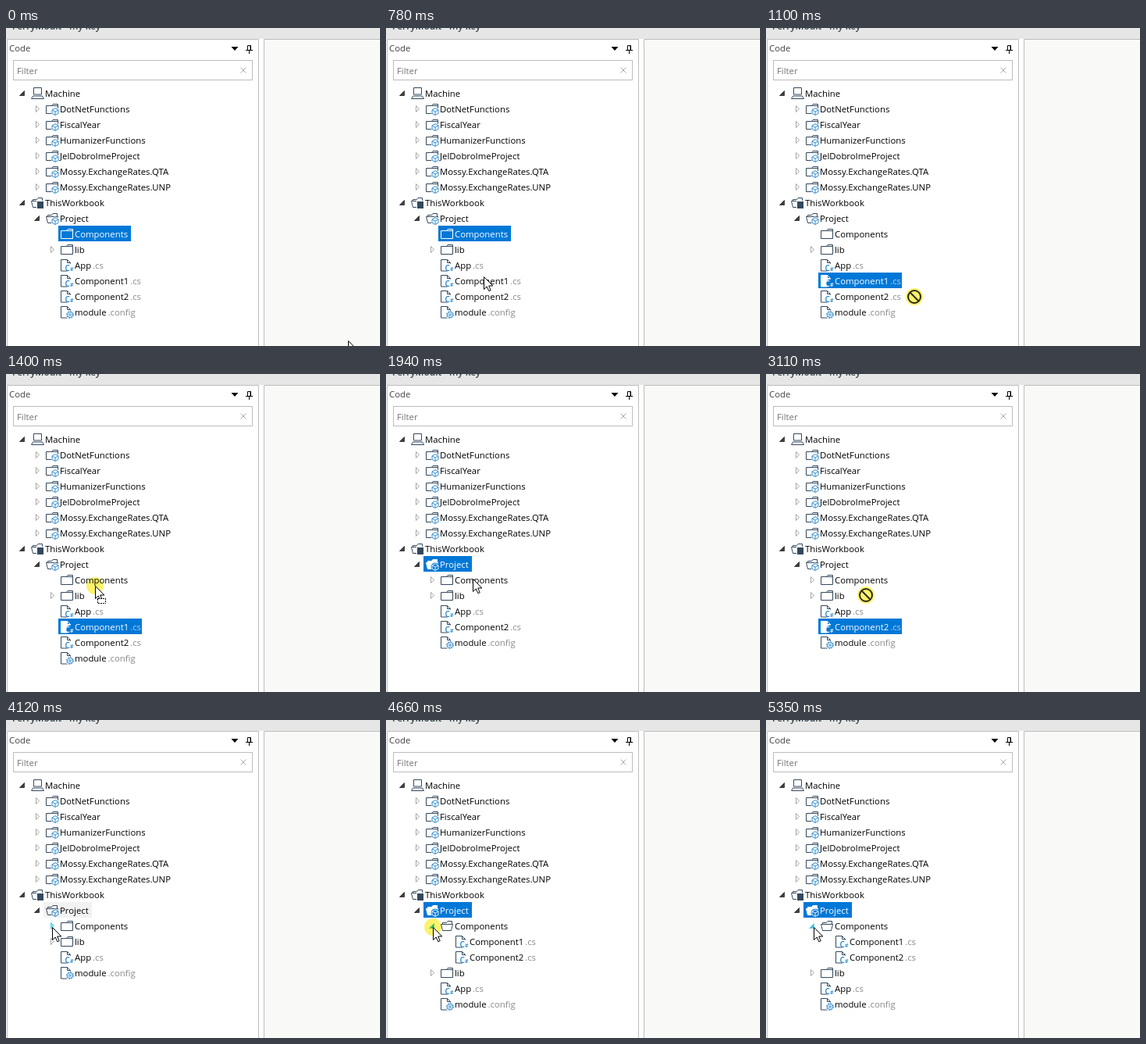
These frames come from a looping animation (479 px wide and 407 px high, 6830 ms). An HTML page:

```html
<!DOCTYPE html>
<html lang="en">
<head>
<meta charset="utf-8">
<title>Project tree</title>
<style>
html, body { margin: 0; width: 100%; height: 100%; overflow: hidden; background: #fff; }
svg { display: block; }
text { font: 11.35px "Open Sans", "Noto Sans", sans-serif; white-space: pre; }
.glow { fill: #fcf25a; fill-opacity: .9; mix-blend-mode: multiply; }
</style>
</head>
<body>
<svg id="stage" width="479" height="407" viewBox="0 0 479 407">
  <rect width="479" height="407" fill="#fff"/>
  <rect width="479" height="14" fill="#e6e6e6"/>
  <text x="8" y="2" fill="#34474d" style="font-size:11.8px;font-weight:600">FerryMoult - my key</text>
  <rect x="331" y="14" width="148" height="393" fill="#f9f9f8"/>
  <g fill="none" stroke="#bdbdbd">
    <path d="M1.5 407V14.5H323.5V407M330.5 407V14.5H479"/>
    <rect x="9.5" y="41.5" width="306" height="25"/>
    <path d="M300.5 50.5l7 7m0-7l-7 7" stroke="#aaa"/>
  </g>
  <text x="4" y="30" fill="#444">Code</text>
  <text x="14" y="59" fill="#767676">Filter</text>
  <path d="M288.5 24h9l-4.5 5z"/>
  <path d="M309.5 28V22.5h4V28M313 22v6M307 28.5h9M311.5 29v4" fill="none" stroke="#000"/>
  <g id="tree"></g>
  <g id="pointer"></g>
</svg>
<script>
const LOOP = 6830;
const tree = document.getElementById('tree');
const pointer = document.getElementById('pointer');

const path = (d, stroke, fill = 'none') => `<path d="${d}" stroke="${stroke}" fill="${fill}"/>`;

const FOLDER = 'M.5 6.5h7l1.5-2h6.5v12h-15zM7.5 6.5h8';
const OPEN = 'M2.5 8.5v-2h5l1.5-2h5.5v4M.5 8.500h15l-2 8h-11z';
const PAGE = 'M.5 3.5h8l4 4v10.5h-12zM8.5 3.5v4h4';

// Clears a corner of the icon for its badge
const patch = ground => `<circle cx="12" cy="14" r="5.5" fill="${ground}"/>`;

function cube(ink, ground) {
  return patch(ground) + '<g stroke-width=".9">' +
    path('M12 9.7l4 2.2v4.4l-4 2.2-4-2.2v-4.4z', ink) +
    path('M8.3 12.100l3.700 2 3.700-2M12 14.100v4', ink) + '</g>';
}

function gear(ink, ground) {
  return patch(ground) + `<g fill="none" stroke="${ink}">` +
    '<circle cx="12" cy="14" r="4.4" stroke-dasharray="1.7 1.756"/>' +
    '<circle cx="12" cy="14" r="3.5" stroke-width=".9"/><circle cx="12" cy="14" r="1.3" stroke-width=".9"/></g>';
}

function sharp(ink, ground) {
  return patch(ground) + `<g fill="${ink}"><text x="5.5" y="18" style="font-size:10px;font-weight:600">C</text>` +
    '<text x="12" y="18" style="font-size:7px;font-weight:600">#</text></g>';
}

const icons = {
  machine: ink => path('M3.5 3.5h10v8.500h-10zM.5 17.5l2-3.500h12l2 3.500z', ink),
  book: (ink, blue, ground) => path(OPEN, ink) +
    `<rect x="7" y="8" width="10" height="11" fill="${ground}"/><rect x="8" y="9" width="8" height="9" fill="${ink}"/>`,
  module: (ink, blue, ground) => path(FOLDER, ink) + cube(blue, ground),
  project: (ink, blue, ground, body) => path(OPEN, ink, body) + cube(blue, ground),
  folder: ink => path(FOLDER, ink),
  open: ink => path(OPEN, ink),
  code: (ink, blue, ground, body) => path(PAGE, ink, body) + sharp(blue, ground),
  config: (ink, blue, ground) => path(PAGE, ink) + gear(blue, ground)
};

function expander(kind, hover) {
  if (kind === 'down') {
    return hover ? path('M6.5 7.5v6h-6z', '#6fd2f0', '#3fc0ea') : path('M6.5 7.5v6h-6z', '#404040', '#404040');
  }
  return path('M2.5 6.5l4 4-4 4z', hover ? '#4cc8ee' : '#a6a6a6', hover ? '#8fe0f7' : '#fff');
}

// Selection widths by label
const barWidth = { Components: 93, Component1: 107, Component2: 107, Project: 62 };

function row(item, i, state) {
  const { depth, icon, label, ext = '', arrow } = item;
  const x = 50 + 19 * depth, y = 73 + 20 * i;
  const on = state.sel === label, soft = state.soft === label;
  const ground = on ? '#0078d7' : soft ? '#f2f2f2' : '#fff';
  const ink = on ? '#fff' : '#34495e', blue = on ? '#fff' : '#1e82c8';
  const body = on ? '#fff' : 'none';
  let out = '';
  if (on || soft) out += `<rect x="${x - 21}" y="${y}" width="${barWidth[label]}" height="20" fill="${ground}"/>`;
  if (arrow) out += `<g transform="translate(${x - 33} ${y})">${expander(arrow, state.hover && label === 'Components')}</g>`;
  out += `<g transform="translate(${x - 18} ${y})">${icons[icon](ink, blue, ground, body)}</g>`;
  out += `<text x="${x}" y="${y + 15}" fill="${on ? '#fff' : '#000'}">${label}` +
    (ext && `<tspan dx="2" fill="${on ? '#b5cfe6' : '#8a8a8a'}">${ext}</tspan>`) + '</text>';
  return out;
}

const modules = ['DotNetFunctions', 'FiscalYear', 'HumanizerFunctions', 'JelDobroImeProject',
  'Mossy.ExchangeRates.QTA', 'Mossy.ExchangeRates.UNP'];

function items({ loose, inside = 0, expanded }) {
  const file = (n, depth) => ({ depth, icon: 'code', label: 'Component' + n, ext: '.cs' });
  return [
    { depth: 0, icon: 'machine', label: 'Machine', arrow: 'down' },
    ...modules.map(label => ({ depth: 1, icon: 'module', label, arrow: 'right' })),
    { depth: 0, icon: 'book', label: 'ThisWorkbook', arrow: 'down' },
    { depth: 1, icon: 'project', label: 'Project', arrow: 'down' },
    { depth: 2, icon: expanded ? 'open' : 'folder', label: 'Components', arrow: expanded ? 'down' : inside ? 'right' : '' },
    ...(expanded ? [file(1, 3), file(2, 3)] : []),
    { depth: 2, icon: 'folder', label: 'lib', arrow: 'right' },
    { depth: 2, icon: 'code', label: 'App', ext: '.cs' },
    ...loose.map(n => file(n, 2)),
    { depth: 2, icon: 'config', label: 'module', ext: '.config' }
  ];
}

const states = [
  { at: 0, loose: [1, 2], sel: 'Components' },
  { at: 870, loose: [1, 2], sel: 'Component1' },
  { at: 1940, loose: [2], inside: 1, sel: 'Project' },
  { at: 2030, loose: [2], inside: 1, soft: 'Project' },
  { at: 2650, loose: [2], inside: 1, sel: 'Component2' },
  { at: 3820, loose: [], inside: 2, soft: 'Project' },
  { at: 4120, loose: [], inside: 2, soft: 'Project', hover: true },
  { at: 4510, loose: [], inside: 2, sel: 'Project', hover: true, expanded: true }
];

// Pointer stops: time, x, y, shape, pressed
const stops = [
  [0, 438, 400], [80, 322, 381], [160, 206, 361],
  [310, 188, 352], [390, 160, 337], [470, 139, 326], [550, 128, 320], [630, 124, 318],
  [780, 125, 318], [870, 125, 318, 'arrow', 1], [950, 150, 327, 'no', 1], [1030, 190, 344, 'no', 1],
  [1110, 212, 355, 'no', 1], [1180, 182, 329, 'no', 1], [1250, 144, 298, 'no', 1],
  [1330, 122, 278, 'move', 1], [1400, 114, 271, 'move', 1],
  [1480, 113, 266, 'move', 1], [1560, 111, 262, 'move', 1], [1640, 111, 262, 'move'], [1710, 111, 262],
  [2260, 115, 284], [2330, 119, 314], [2400, 120, 333],
  [2650, 121, 329, 'arrow', 1], [2730, 123, 330, 'arrow', 1], [2800, 126, 331, 'no', 1], [2870, 127, 331, 'no', 1],
  [3040, 128, 308, 'no', 1], [3110, 128, 283, 'no', 1], [3190, 123, 271, 'move', 1], [3270, 120, 267, 'move', 1],
  [3420, 119, 263, 'move', 1], [3500, 119, 263],
  [3970, 97, 264], [4050, 73, 265], [4120, 59, 265], [4200, 57, 265], [4280, 60, 265],
  [4430, 60, 265, 'arrow', 1], [4740, 60, 265], [5350, 61, 265]
];

const ARROW = path('M.5.5v16l3.7-3.5 2.6 5.7 2.4-1-2.5-5.7h5.1z', '#000', '#fff');
const shapes = {
  arrow: ARROW,
  move: ARROW + '<rect x="3.5" y="16.5" width="10" height="6" fill="#fff" stroke="#000" stroke-dasharray="2 1" shape-rendering="crispEdges"/>',
  no: '<g fill="none" stroke="#2b2b22" stroke-width="2"><circle r="8"/><path d="M-5.7-5.7L5.7 5.7"/></g>'
};

function drawPointer([, x, y, shape = 'arrow', pressed]) {
  const glow = pressed ? `<circle class="glow" cx="${x}" cy="${y}" r="11"/>` : '';
  pointer.innerHTML = `${glow}<g transform="translate(${x} ${y})">${shapes[shape]}</g>`;
}

function drawTree(state) {
  tree.innerHTML = items(state).map((item, i) => row(item, i, state)).join('');
}

const start = performance.now();
let shownState, shownStop;

function draw(now) {
  const t = Math.max(0, now - start) % LOOP;
  const state = states.filter(s => s.at <= t).pop();
  const stop = stops.filter(s => s[0] <= t).pop();
  if (state !== shownState) drawTree(shownState = state);
  if (stop !== shownStop) drawPointer(shownStop = stop);
  requestAnimationFrame(draw);
}
draw(start);
</script>
</body>
</html>
```
